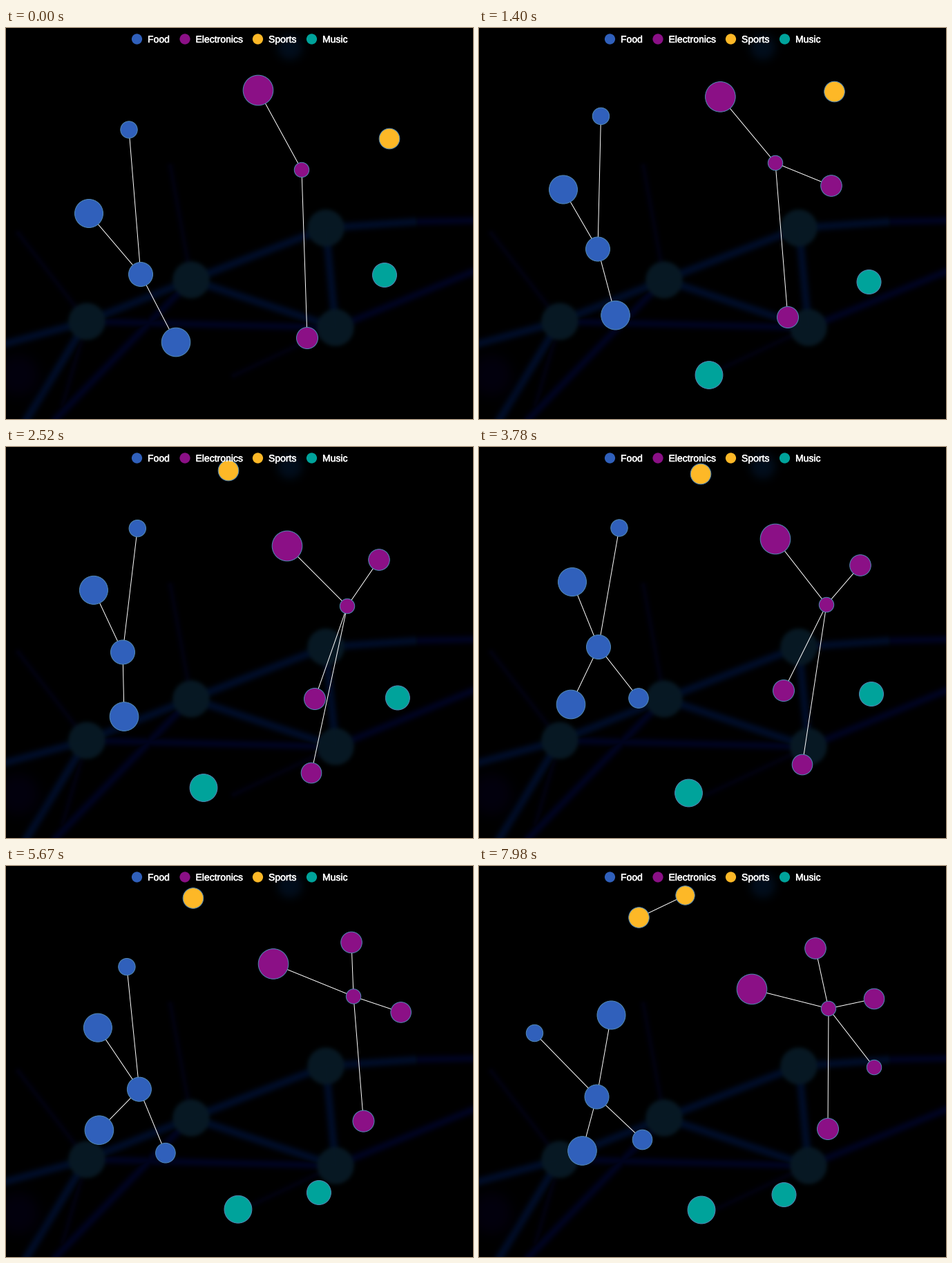
Recreate the animation shown at these times as a matplotlib script. Size 676 by 565 pixels, loop 8000 ms.

```python
import numpy as np
import matplotlib.pyplot as plt
from matplotlib.animation import FuncAnimation
from matplotlib.patches import Circle
from matplotlib.patheffects import withStroke

W, H, DPI = 676, 565, 100
PX = 72 / DPI
LOOP, INTERVAL, STEP = 8000, 40, 70
POSES = (0, 1400, 2520, 3780, 4830, 6650, 7980)  # times of the key poses, ms
REGROUP = 6950                                   # the last regrouping starts here
ENTRY = 900                                      # flight of a new node, ms
CENTRE = np.array([W / 2, H / 2])
BLUE, PURPLE, YELLOW, TEAL = "#3060bb", "#8b1086", "#fdb827", "#00a39b"
EDGE = "#5288b4"

fig = plt.figure(figsize=(W / DPI, H / DPI), dpi=DPI, facecolor="black")
ax = fig.add_axes([0, 0, 1, 1])
ax.set_xlim(0, W)
ax.set_ylim(H, 0)
ax.axis("off")


# ---- blurred network backdrop ----
def backdrop():
    yy, xx = np.mgrid[0:H, 0:W] + 0.5
    img = np.zeros((H, W, 3))

    def soft(d, r, blur):
        return 1 / (1 + np.exp(np.clip((d - r) / blur, -40, 40)))

    def beam(p, q, r, color):
        dx, dy = q[0] - p[0], q[1] - p[1]
        u = np.clip(((xx - p[0]) * dx + (yy - p[1]) * dy) / (dx * dx + dy * dy), 0, 1)
        d = np.hypot(xx - p[0] - u * dx, yy - p[1] - u * dy)
        np.maximum(img, soft(d, r, 2.1)[..., None] * color, out=img)

    def blob(p, r, color, blur):
        a = soft(np.hypot(xx - p[0], yy - p[1]), r, blur)[..., None]
        img[:] = img * (1 - a) + a * np.array(color)

    a, b, c, d = (117, 424), (268, 364), (463, 289), (477, 433)
    bend = (590, 280)
    main, dim, faint = np.array([[0, 13, 40], [0, 4, 33], [2, 2, 17]])
    for p, q in [(a, (0, 456)), (a, (30, H)), (a, b), (b, c), (c, d), (b, d), (c, bend)]:
        beam(p, q, 5.5, main)
    for p, q in [(a, d), (bend, (W, 278)), (d, (W, 352)), (b, (72, H))]:
        beam(p, q, 5, dim)
    for p, q in [(a, (18, 297)), (a, (82, 545)), (b, (238, 200)), (d, (330, 502))]:
        beam(p, q, 3, faint)
    for p in (a, b, c, d):
        blob(p, 26.5, (8, 25, 36), 1.7)
    blob((411, 28), 17, (2, 14, 29), 4)
    blob((18, 502), 28, (3, 0, 14), 6)
    return img / 255


ax.imshow(backdrop(), extent=(0, W, H, 0), aspect="auto",
          interpolation="nearest", zorder=0)


# ---- moving nodes ----
def slopes(t, p):
    """Monotone cubic tangents: no overshoot, rest at the end."""
    d = np.diff(p, axis=0) / np.diff(t)[:, None]
    same = d[:-1] * d[1:] > 0
    total = np.where(same, d[:-1] + d[1:], 1)
    mid = np.where(same, 2 * d[:-1] * d[1:] / total, 0)
    return np.vstack([d[:1], mid, np.zeros((1, 2))])


def ease(u):
    u = min(max(u, 0), 1)
    return u * u * (3 - 2 * u)


class Node:
    """A dot with a few key poses; a leaf's poses are offsets from its hub."""

    def __init__(self, color, r, poses, hub=None):
        self.r, self.hub = r, hub
        knots = [(POSES[i], np.array(p, float)) for i, p in poses.items()]
        self.born = 0
        if knots[0][0] > 0:
            self.born = knots[0][0] - ENTRY
            start = CENTRE - hub.at(self.born) if hub else CENTRE
            knots.insert(0, (self.born, start))
        if knots[-1][0] > REGROUP and self.born < REGROUP:
            knots.insert(-1, (REGROUP, knots[-2][1]))
        self.t = np.array([t for t, _ in knots], float)
        self.p = np.array([p for _, p in knots])
        self.m = slopes(self.t, self.p)
        self.dot = Circle((0, 0), r, fc=color, ec=EDGE, lw=PX, zorder=3)
        ax.add_patch(self.dot)

    def at(self, t):
        s = min(max(t, self.t[0]), self.t[-1])
        i = min(np.searchsorted(self.t, s, side="right") - 1, len(self.t) - 2)
        h = self.t[i + 1] - self.t[i]
        u = (s - self.t[i]) / h
        p, m = self.p, self.m
        pos = ((1 + 2 * u) * (1 - u) ** 2 * p[i] + u * (1 - u) ** 2 * h * m[i]
               + u * u * (3 - 2 * u) * p[i + 1] + u * u * (u - 1) * h * m[i + 1])
        return pos + self.hub.at(t) if self.hub else pos

    def update(self, t):
        grow = 0.3 + 0.7 * ease((t - self.born) / 300) if self.born else 1
        self.dot.set_visible(t >= self.born)
        self.dot.center = self.at(t)
        self.dot.radius = self.r * grow - 0.5


class Link:
    def __init__(self, leaf):
        self.leaf = leaf
        self.line, = ax.plot([], [], color="white", lw=PX, zorder=2)

    def update(self, t):
        self.line.set_visible(t >= self.leaf.born)
        self.line.set_data(*np.array([self.leaf.hub.at(t), self.leaf.at(t)]).T)


def cluster(color, hub_r, hub_poses, *leaves):
    hub = Node(color, hub_r, hub_poses)
    dots = [Node(color, r, poses, hub) for r, poses in leaves]
    return [hub, *dots, *map(Link, dots)]


def each(*points):
    return dict(enumerate(points))


parts = [
    *cluster(
        BLUE, 18,
        each((195, 356), (172, 319.5), (169, 296.5), (173, 289),
             (196, 326), (189, 318.5), (170.5, 333.5)),
        (12.7, {0: (-17, -209), 3: (30, -172), 4: (-18, -177), 6: (-90, -92)}),
        (21, {0: (-75, -88), 1: (-50, -86), 3: (-38, -94), 4: (-60, -89), 6: (21, -118)}),
        (21.3, {0: (51, 98), 2: (2, 93), 3: (-40, 83), 4: (-58, 59), 6: (-21, 78)}),
        (14.8, {3: (58, 74), 4: (38, 92), 6: (66, 62)})),
    *cluster(
        PURPLE, 11.2,
        each((428, 205), (429, 195), (494, 230), (503, 228),
             (511, 188), (493, 189), (506, 206)),
        (22.3, {0: (-63, -115), 2: (-87, -87), 3: (-74, -95), 4: (-116, -47), 6: (-111, -28)}),
        (16, each((8, 243), (18, 223), (-47, 134), (-62, 124),
                  (-5, 162), (25, 191), (-1, 174))),
        (15.8, {1: (81, 33), 2: (46, -67), 3: (49, -57), 4: (-3, -78), 6: (-19, -87)}),
        (15.3, {2: (-52, 241), 3: (-35, 231), 4: (57, 61), 5: (74, 4), 6: (66, -14)}),
        (11.2, {5: (55, 92), 6: (66, 85)})),
    *cluster(
        YELLOW, 15.3,
        each((555, 160), (514.5, 92), (322, 34), (321, 39),
             (281.5, 43), (265.5, 49), (231.5, 74.5)),
        (14.2, {6: (67, -32)})),
    Node(TEAL, 18, {0: (548, 357), 1: (564.5, 367), 3: (568, 357),
                    4: (475.5, 465), 5: (441.5, 475)}),
    Node(TEAL, 20.4, {1: (333, 501.5), 2: (286, 492.5), 3: (303.5, 500),
                      4: (347, 495.5), 5: (322, 497)}),
]

# ---- legend ----
bolder = [withStroke(linewidth=0.45 * PX, foreground="white")]
for x, label, color in [(189.5, "Food", BLUE), (259, "Electronics", PURPLE),
                        (364.5, "Sports", YELLOW), (442.5, "Music", TEAL)]:
    ax.add_patch(Circle((x, 16), 7.6, fc=color, lw=0, zorder=5))
    ax.text(x + 15.5, 21, label, color="white", fontsize=14 * PX, zorder=5,
            family="Liberation Sans", va="baseline", path_effects=bolder)


def draw(k):
    t = round(k * INTERVAL / STEP) * STEP
    for part in parts:
        part.update(t)
    return [p.dot if isinstance(p, Node) else p.line for p in parts]


anim = FuncAnimation(fig, draw, frames=LOOP // INTERVAL, interval=INTERVAL,
                     repeat=True, repeat_delay=0)
plt.show()
```
